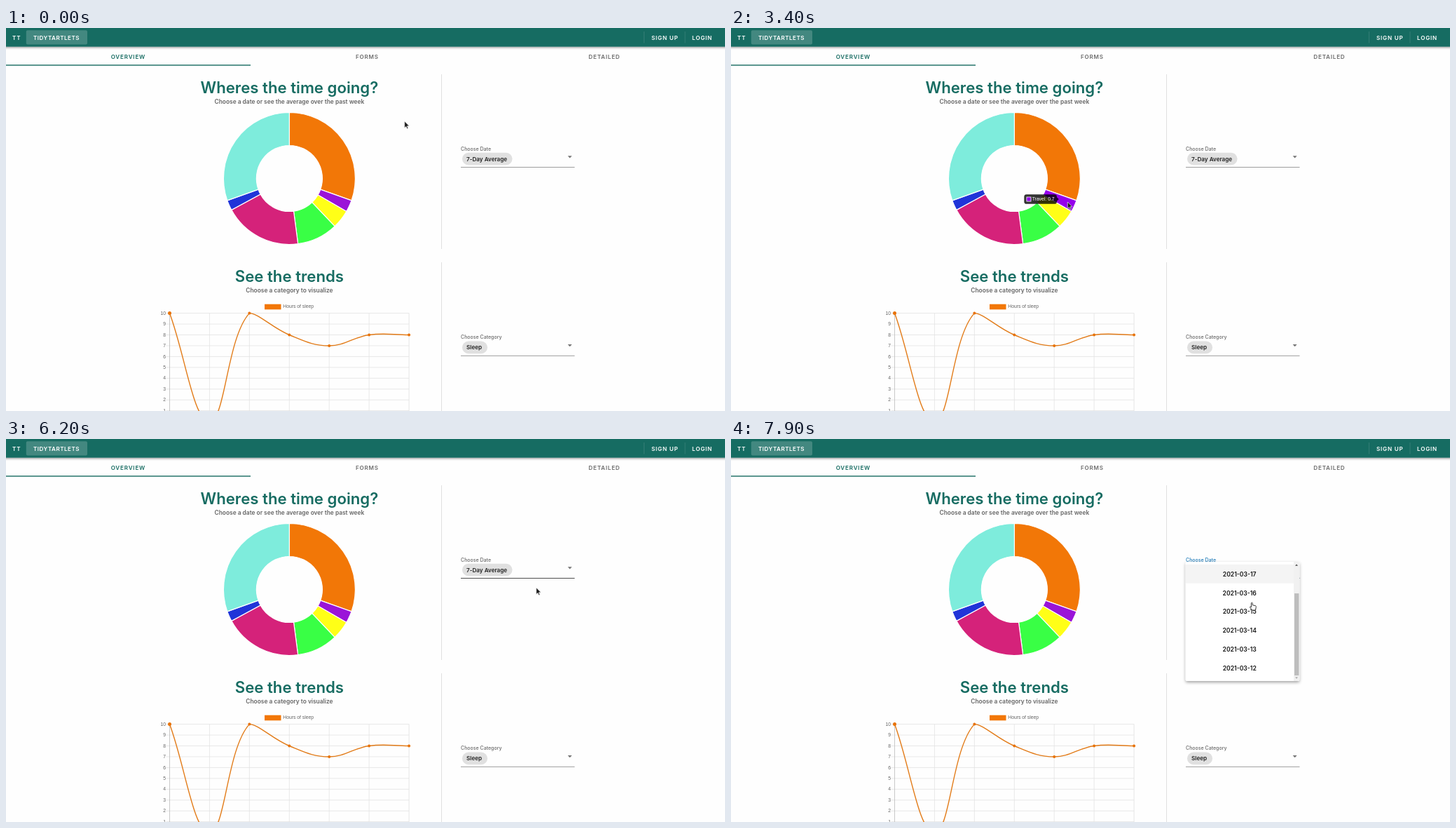
Write an HTML page that moves like this. It is 1026 px wide and 546 px high and loops after 8000 ms.

```html
<!DOCTYPE html>
<html lang="en">
<head>
<meta charset="utf-8">
<title>Time overview</title>
<style>
  html, body { margin: 0; width: 100%; height: 100%; overflow: hidden; background: #fefefe; }
  svg { display: block; width: 1026px; height: 546px; font-family: Inter, "Open Sans", sans-serif; font-weight: 600; }
  .nav { font-size: 8.1px; letter-spacing: .8px; }
  .brand { letter-spacing: .48px; }
  .title { font-size: 22.2px; fill: #176c62; }
  .sub { font-size: 8.4px; fill: #666; }
  .label { font-size: 7px; font-weight: 500; fill: #666; }
  .chip { font-size: 8.15px; fill: #222; }
  .item { font-size: 8.6px; fill: #151515; }
  .picked { font-size: 9.1px; fill: #2f83c4; }
  .plot { font: 6.8px "Liberation Sans", Arial, sans-serif; fill: #666; }
  .mid { text-anchor: middle; }
  .end { text-anchor: end; }
</style>
</head>
<body>
<svg id="stage" viewBox="0 0 1026 546"></svg>
<script>
const LOOP = 8000, SCALE = 0.57;
const stage = document.getElementById('stage');
const TEAL = '#176c62';

const text = (x, y, cls, str, extra = '') => `<text x="${x}" y="${y}" class="${cls}" ${extra}>${str}</text>`;
const rect = (x, y, w, h, fill, extra = '') =>
  `<rect x="${x}" y="${y}" width="${w}" height="${h}" fill="${fill}" ${extra}/>`;
const line = (x1, y1, x2, y2, color, w = 1, extra = '') =>
  `<line x1="${x1}" y1="${y1}" x2="${x2}" y2="${y2}" stroke="${color}" stroke-width="${w}" ${extra}/>`;

// Doughnut
const CX = 404.4, CY = 214.5, OUTER = 94, INNER = 47;
const slices = [
  { name: 'Sleep', hours: 7.3, color: '#f27707', hover: '#f47500' },
  { name: 'Travel', hours: 0.7, color: '#9a14d8', hover: '#9500ec' },
  { name: 'Exercise', hours: 1.1, color: '#ffff17', hover: '#ffff00' },
  { name: 'On the phone', hours: 2.4, color: '#39ff45', hover: '#17ff24' },
  { name: 'Work', hours: 4.6, color: '#d5227a' },
  { name: 'Chores', hours: 0.6, color: '#2034d8' },
  { name: 'Leisure', hours: 7.3, color: '#7eecdc' }
];
const polar = (hour, r) => {
  const a = hour / 24 * 2 * Math.PI;
  return [CX + r * Math.sin(a), CY - r * Math.cos(a)];
};

function doughnut() {
  let from = 0;
  return slices.map(s => {
    const to = from + s.hours;
    s.center = polar((from + to) / 2, (OUTER + INNER) / 2);
    const d = `M${polar(from, OUTER)}A${OUTER} ${OUTER} 0 0 1 ${polar(to, OUTER)}` +
      `L${polar(to, INNER)}A${INNER} ${INNER} 0 0 0 ${polar(from, INNER)}Z`;
    from = to;
    return `<path class="slice" d="${d}" fill="${s.color}" stroke="#fff" stroke-width="1.2"/>`;
  }).join('');
}

// Line chart
const X0 = 233.5, DX = 56.93, TOP = 406.6, DY = 15.45, BOTTOM = TOP + 10 * DY;

function lineChart() {
  const pts = [10, 0, 10, 8, 7, 8, 8].map((v, i) => [X0 + i * DX, TOP + (10 - v) * DY]);
  const cap = y => Math.max(TOP, Math.min(BOTTOM, y));
  const handles = pts.map((p, i) => {
    const a = pts[i - 1] || p, b = pts[i + 1] || p;
    const da = Math.hypot(p[0] - a[0], p[1] - a[1]), db = Math.hypot(b[0] - p[0], b[1] - p[1]);
    const fa = 0.4 * da / (da + db), fb = 0.4 * db / (da + db);
    return {
      before: [p[0] - fa * (b[0] - a[0]), cap(p[1] - fa * (b[1] - a[1]))],
      after: [p[0] + fb * (b[0] - a[0]), cap(p[1] + fb * (b[1] - a[1]))]
    };
  });
  let out = '';
  for (let i = 0; i <= 10; i++) {
    const y = TOP + i * DY;
    out += line(X0 - 5, y, X0 + 6 * DX, y, '#e3e3e3', 0.8) + text(228, y + 2.1, 'plot end', 10 - i);
  }
  pts.forEach(([x], i) => out += line(x, TOP, x, BOTTOM, i ? '#e3e3e3' : '#bbb', 0.8));
  const d = pts.slice(1).reduce((s, p, i) => s + `C${handles[i].after} ${handles[i + 1].before} ${p}`, `M${pts[0]}`);
  out += `<path d="${d}" fill="none" stroke="#e27b18" stroke-width="1.4"/>`;
  pts.forEach(([x, y], i) => out += `<circle cx="${x}" cy="${y}" r="${i ? 2 : 2.5}" fill="#e87308"/>`);
  return out + rect(369, 393.7, 23.5, 7.6, '#f27707') + text(395.3, 399.4, 'plot', 'Hours of sleep');
}

const select = (y, label, value, width, id) =>
  text(649, y + 3, 'label', label, `id="${id}Label"`) +
  rect(651, y + 6.3, width, 17.6, '#e0e0e0', 'rx="8.8"') + text(657, y + 18.1, 'chip', value) +
  `<path d="M801.6 ${y + 10.7}h6l-3 3.2z" fill="#757575"/>` +
  line(649, y + 27, 811.5, y + 27, '#949494', 0.9, `id="${id}Line"`);

// Dropdown
const MENU = { x: 648.7, y: 175, w: 162.5, h: 170, row: 26.9, pad: 4 };
const options = ['7-Day Average', ...Array.from({ length: 7 }, (_, i) => `2021-03-${18 - i}`)];
const rowTop = i => MENU.y + MENU.pad + i * MENU.row;

const menu = () => `<g id="menu">
  ${rect(MENU.x, MENU.y, MENU.w, MENU.h, '#fff', 'rx="2" filter="url(#lift)"')}
  <g clip-path="url(#menuClip)"><g id="list">
    ${rect(MENU.x, rowTop(0), 155, MENU.row, '#e6f1f6')}
    ${rect(MENU.x, 0, 155, MENU.row, '#f4f4f4', 'id="highlight"')}
    ${options.map((o, i) => text(725.7, rowTop(i) + 16.8, i ? 'item mid' : 'item picked mid', o)).join('')}
  </g>
  ${rect(803, MENU.y, 8.2, MENU.h, '#f1f1f1')}${rect(804, 183, 6.4, 117, '#bdbdbd', 'id="thumb"')}
  <path id="upArrow" d="M805 180.8h4l-2-2.4z"/><path id="downArrow" d="M805 339.4h4l-2 2.4z"/></g></g>`;

stage.innerHTML = `<defs>
  <filter id="lift" x="-10%" y="-10%" width="120%" height="120%">
    <feDropShadow dx="0" dy="2" stdDeviation="2.2" flood-opacity=".36"/></filter>
  <filter id="bar" x="-2%" y="-10%" width="104%" height="150%">
    <feDropShadow dx="0" dy="1.4" stdDeviation="1.6" flood-opacity=".4"/></filter>
  <clipPath id="menuClip">${rect(MENU.x, MENU.y, MENU.w, MENU.h, '#000', 'rx="2"')}</clipPath></defs>
  ${rect(0, 0, 1026, 546, '#fefefe')}
  ${rect(-9, -9, 1044, 35.6, TEAL, 'filter="url(#bar)"')}
  ${rect(28.8, 3.2, 87.2, 20.2, '#438880', 'rx="2"')}
  <g fill="#fff">${text(9, 16.5, 'nav', 'TT')}${text(39, 16.5, 'nav brand', 'TIDYTARTLETS')}
  ${text(921, 16.5, 'nav', 'SIGN UP')}${text(979, 16.5, 'nav', 'LOGIN')}</g>
  ${line(910.5, 5, 910.5, 21.5, '#337d74')}${line(969, 5, 969, 21.5, '#337d74')}
  ${text(174.4, 43.5, 'nav mid', 'OVERVIEW', `fill="${TEAL}"`)}
  ${text(515.4, 43.5, 'nav mid', 'FORMS', 'fill="#6d6d6d"')}${text(853.9, 43.5, 'nav mid', 'DETAILED', 'fill="#6d6d6d"')}
  ${rect(0, 52.3, 349, 1.4, TEAL)}
  ${line(621.5, 66, 621.5, 315, '#e0e0e0')}${line(621.5, 334, 621.5, 546, '#e0e0e0')}
  ${text(404.4, 92.8, 'title mid', 'Wheres the time going?')}
  ${text(404.4, 107.7, 'sub mid', 'Choose a date or see the average over the past week')}
  ${text(404.4, 361.6, 'title mid', 'See the trends')}
  ${text(404.4, 376.5, 'sub mid', 'Choose a category to visualize')}
  ${doughnut()}${lineChart()}
  ${select(171.5, 'Choose Date', '7-Day Average', 71.5, 'date')}
  ${select(440.3, 'Choose Category', 'Sleep', 36, 'kind')}
  ${line(649, 198.3, 811.5, 198.3, '#24506f', 1.2, 'id="focusLine"')}
  <g id="tip"><path id="tipBody" fill="#000" fill-opacity=".8"/>
    ${rect(0, -3.4, 6.9, 6.9, '#fff', 'id="tipFrame"')}${rect(0, -2.6, 5.3, 5.3, '#000', 'id="tipColor"')}
    ${text(0, 2.3, 'plot', '', 'id="tipText" style="fill:#fff"')}</g>
  ${menu()}
  <g id="pointer"><path id="arrow" d="M0 0V9.4L2.2 7.4L3.7 10.7L5.2 10L3.7 6.8H6.7Z"
      fill="#1c1c1c" stroke="#fff" stroke-width=".6"/>
    <path id="hand" d="M-.9 1Q0 -.5 .9 1V4L5 4.8Q6.2 5.2 6 6.6L5.2 11.2H.3L-2.6 7.4Q-3 6 -1.8 6.2L-.9 7Z"
      fill="#fff" stroke="#222" stroke-width=".9"/></g>`;

const el = Object.fromEntries([...stage.querySelectorAll('[id]')].map(n => [n.id, n]));
const sliceEls = [...stage.querySelectorAll('.slice')];
const set = (node, attrs) => { for (const k in attrs) node.setAttribute(k, attrs[k]); };

// [ms, x, y]
const path = [
  [0, 568.7, 133], [1000, 568.7, 133], [1100, 556, 130], [1300, 556, 130], [1400, 546, 133],
  [1700, 493.3, 154.5], [2100, 464, 172], [2600, 464, 172], [3100, 478, 236], [3400, 480.3, 248],
  [3700, 480.3, 248], [4400, 466, 263], [4700, 466, 263], [5000, 445, 279], [5200, 441, 283],
  [5400, 441, 283], [5500, 475, 288], [5800, 639, 306], [5900, 639, 306], [6000, 692, 262],
  [6200, 756.7, 212], [6400, 745.5, 179], [6800, 745.5, 179], [7200, 743.3, 232.8], [LOOP, 743.3, 232.8]
];
// [ms, hovered slice]
const hovers = [[0, -1], [1750, 0], [3050, 1], [4000, 2], [4835, 3], [5450, -1]];

const lerp = (a, b, p) => a + (b - a) * p;
const easeOut = p => 1 - (1 - Math.min(1, p)) ** 4;

function pointerAt(t) {
  const i = path.findIndex(k => k[0] > t), a = path[i - 1], b = path[i];
  const p = (t - a[0]) / (b[0] - a[0]);
  return [lerp(a[1], b[1], p), lerp(a[2], b[2], p)];
}

function drawTip(t) {
  const i = hovers.findLastIndex(h => h[0] <= t);
  const now = hovers[i][1], before = i ? hovers[i - 1][1] : -1;
  const p = easeOut((t - hovers[i][0]) / 400);
  sliceEls.forEach((n, k) => n.setAttribute('fill', k === now ? slices[k].hover : slices[k].color));
  const shown = now < 0 ? before : now;
  el.tip.setAttribute('opacity', now < 0 ? (before < 0 ? 0 : 1 - p) : (before < 0 ? p : 1));
  if (shown < 0) return;
  const s = slices[shown], start = before < 0 ? s.center : slices[before].center;
  const x = lerp(start[0], s.center[0], p), y = lerp(start[1], s.center[1], p);
  el.tipText.textContent = `${s.name}: ${s.hours}`;
  const caret = 5 * SCALE, w = el.tipText.getComputedTextLength() + 14.8, h = 6.8, r = 3.4;
  const right = -caret - 0.6, left = right - w;
  set(el.tipBody, {
    d: `M${left + r} ${-h}H${right - r}Q${right} ${-h} ${right} ${-h + r}V${-caret}L${right + caret} 0L${right} ${caret}` +
      `V${h - r}Q${right} ${h} ${right - r} ${h}H${left + r}Q${left} ${h} ${left} ${h - r}V${-h + r}Q${left} ${-h} ${left + r} ${-h}Z`
  });
  set(el.tipFrame, { x: left + 3.2 });
  set(el.tipColor, { x: left + 4, fill: s.hover });
  set(el.tipText, { x: left + 11.4 });
  set(el.tip, { transform: `translate(${x} ${y})` });
}

function drawSelect(t, y) {
  const opacity = t < 6600 ? 0 : t < 6700 ? 0.25 : t < 6800 ? 0.57 : 1;
  const focus = t < 6600 ? 0 : t < 6700 ? 0.25 : t < 6800 ? 0.6 : 1;
  const scroll = t < 7500 ? 0 : t < 7900 ? 30 : 54;
  set(el.menu, { opacity });
  set(el.list, { transform: `translate(0 ${-scroll})` });
  set(el.thumb, { y: 183 + scroll * 154 / 224 });
  set(el.upArrow, { fill: scroll ? '#444' : '#a5a5a5' });
  set(el.downArrow, { fill: scroll < 54 ? '#444' : '#a5a5a5' });
  const row = t < 6900 ? 0 : Math.floor((y - rowTop(0)) / MENU.row);
  set(el.highlight, { y: rowTop(row), opacity: row > 0 ? 1 : 0 });
  set(el.dateLine, { stroke: t >= 6200 && t < 6600 ? '#3a3a3a' : '#949494' });
  set(el.focusLine, { x1: 730.2 - 81.2 * focus, x2: 730.2 + 81.2 * focus, opacity: focus ? 1 : 0 });
  el.dateLabel.style.fill = t < 6600 ? '#666' : t < 6800 ? '#3a6f98' : '#1f7bb8';
}

function draw(t) {
  const [x, y] = pointerAt(t);
  const hand = t >= 6300;
  set(el.pointer, { transform: `translate(${x} ${y})` });
  set(el.arrow, { opacity: hand ? 0 : 1 });
  set(el.hand, { opacity: hand ? 1 : 0 });
  drawTip(t);
  drawSelect(t, y);
}

const begin = performance.now();
function tick() {
  const t = (performance.now() - begin) % LOOP;
  draw(Math.floor(t / 100) * 100);
  requestAnimationFrame(tick);
}
tick();
</script>
</body>
</html>
```
